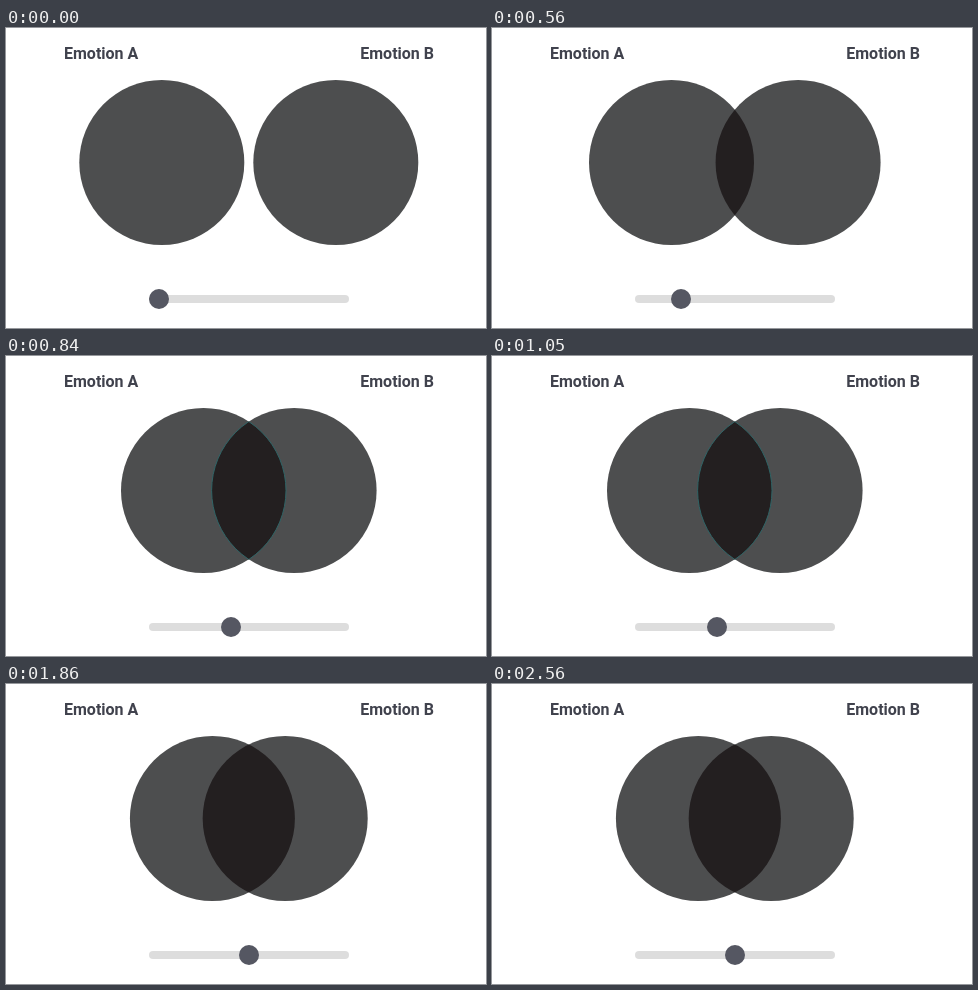
Write an HTML page that moves like this. It is 480 px wide and 300 px high and loops after 2.73 s.

```html
<!DOCTYPE html>
<html lang="en">
<head>
<meta charset="utf-8">
<title>Emotion overlap slider</title>
<style>
  html, body { margin: 0; width: 100%; height: 100%; overflow: hidden; background: #fff; }
  svg { display: block; }
  text { font: 700 16px Roboto, sans-serif; fill: #40424d; }
</style>
</head>
<body>
<svg width="480" height="300" viewBox="0 0 480 300">
  <defs>
    <circle id="left" cy="134.5" r="82.5"/>
    <circle id="right" cy="134.5" r="82.5"/>
    <clipPath id="inLeft"><use href="#left"/></clipPath>
    <clipPath id="inRight"><use href="#right"/></clipPath>
  </defs>
  <text x="58" y="31">Emotion A</text>
  <text x="428" y="31" text-anchor="end">Emotion B</text>
  <g fill="#4d4e4f"><use href="#left"/><use href="#right"/></g>
  <use href="#right" fill="#231f20" clip-path="url(#inLeft)"/>
  <g id="rim" fill="none" stroke="#2f6466" stroke-width="1">
    <use href="#right" clip-path="url(#inLeft)"/>
    <use href="#left" clip-path="url(#inRight)"/>
  </g>
  <rect x="143" y="267" width="200" height="8" rx="4" fill="#ddd"/>
  <circle id="knob" cy="271" r="10" fill="#555762"/>
</svg>
<script>
  const LOOP = 2730, MIDDLE = 242.8;
  // Each slider stop: start time and distance of the circles from the middle
  const stops = [[0, 87], [280, 73.3], [560, 63.3], [700, 56], [840, 45.3], [1190, 36.4]];
  const get = id => document.getElementById(id);
  const [left, right, knob, rim] = ['left', 'right', 'knob', 'rim'].map(get);

  function draw() {
    const t = performance.now() % LOOP;
    const i = stops.findLastIndex(([start]) => start <= t);
    const gap = stops[i][1];
    left.setAttribute('cx', MIDDLE - gap);
    right.setAttribute('cx', MIDDLE + gap);
    knob.setAttribute('cx', 153 + 18 * i);
    rim.setAttribute('visibility', i === 4 ? 'visible' : 'hidden');
    requestAnimationFrame(draw);
  }
  draw();
</script>
</body>
</html>
```
